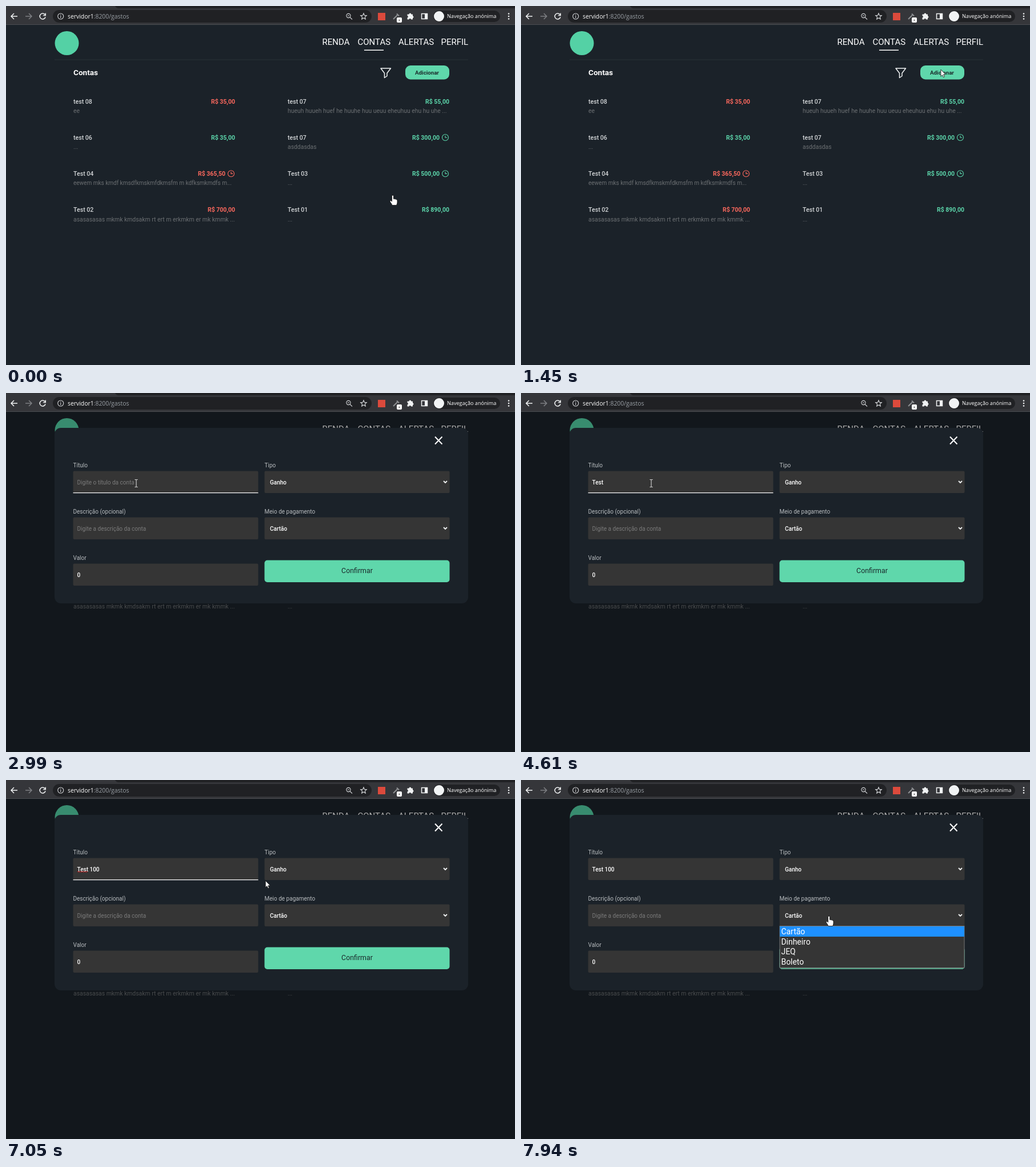
An HTML page for the animation above (8 s loop, 891 by 628 pixels).

```html
<!DOCTYPE html>
<html lang="pt">
<head>
<meta charset="utf-8">
<title>Contas</title>
<style>
  html, body { margin: 0; width: 100%; height: 100%; overflow: hidden; background: #1b2229; }
  svg { display: block; width: 100vw; height: 100vh; }
  text { font: 10px Roboto, sans-serif; fill: #fff; white-space: pre; }
  .chrome text { font-family: "Open Sans", sans-serif; }
  .icon { fill: none; stroke: #f1f3f4; stroke-width: 1.5; }
  .nav text { font-size: 15px; }
  .title { font-size: 10.6px; font-weight: 500; fill: #d3d6d8; }
  .note { font-size: 10.4px; fill: #6b6f72; }
  .money { font-size: 10.5px; font-weight: 700; text-anchor: end; }
  .label { fill: #b9bdc0; }
  .hint { fill: #7b7b7b; }
  .value { font-weight: 500; }
  .field { fill: #353535; }
  .menu text { font-size: 13.9px; }
</style>
</head>
<body>
<svg viewBox="0 0 891 628">
  <rect width="891" height="628" fill="#1b2229"/>

  <g class="chrome">
    <rect width="891" height="33" fill="#35363a"/>
    <path d="M191 0H891V4H197Q193 4 191 0Z" fill="#202124"/>
    <rect y="32" width="891" height="1" fill="#4b4d51"/>
    <rect x="82" y="7" width="558" height="22" rx="11" fill="#202124"/>
    <rect x="748" y="8" width="117" height="20" rx="10" fill="#202124"/>
    <g class="icon">
      <path d="M20 18H9M14 13L9 18L14 23"/>
      <path d="M34 18H45M40 13L45 18L40 23" stroke="#7d7f83"/>
      <path d="M68.300 15.200A5 5 0 1 0 69 19.200M69.200 12.600V16.500H65.200"/>
      <g stroke-width="1.100" stroke="#d5d7da">
        <circle cx="95.700" cy="18" r="5"/>
        <path d="M95.700 17.300V21M95.700 15V16.200"/>
        <circle cx="599.500" cy="17" r="3.600"/>
        <path d="M602 19.700L606 23.500M598 17H601"/>
        <path d="M626 12.700L627.500 16.400L631.300 16.700L628.400 19.200L629.300 23L626 21L622.700 23L623.600 19.200L620.700 16.700L624.500 16.400Z"/>
      </g>
      <path d="M678 23L685 16M684 13.500L688 17.500" stroke="#8c8e91" stroke-width="2"/>
      <rect x="727.500" y="13.500" width="10" height="9"/>
    </g>
    <rect x="651" y="12" width="13" height="13" fill="#dc4a3c"/>
    <rect x="684" y="20" width="9" height="9" rx="2" fill="#fff"/>
    <rect x="687.500" y="24" width="2" height="1.500" fill="#333"/>
    <path d="M702.500 14.500H705.500A1.900 1.900 0 0 1 709.300 14.500H712V17.300A1.900 1.900 0 0 1 712 21V23.500H709A1.800 1.800 0 0 0 705.500 23.500H702.500V20.500A1.800 1.800 0 0 0 702.500 17Z" fill="#f1f3f4"/>
    <rect x="733" y="13" width="5" height="10" fill="#f1f3f4"/>
    <circle cx="758" cy="18" r="9" fill="#f1f3f4"/>
    <text x="772" y="21.300" style="font-size:9.1px">Navegação anónima</text>
    <text x="108" y="22" style="font-size:10.4px">servidor1<tspan fill="#9aa0a6">:8200/gastos</tspan></text>
    <g fill="#f1f3f4">
      <circle cx="880" cy="13.500" r="1.300"/><circle cx="880" cy="18" r="1.300"/><circle cx="880" cy="22.500" r="1.300"/>
    </g>
  </g>

  <circle cx="106.500" cy="65" r="21" fill="#54d1a5"/>
  <g class="nav">
    <text x="553.500" y="67.500">RENDA</text>
    <text x="615.500" y="67.500">CONTAS</text>
    <text x="687" y="67.500">ALERTAS</text>
    <text x="761.500" y="67.500">PERFIL</text>
  </g>
  <rect x="627" y="76.500" width="34" height="1.500" fill="#fff"/>
  <rect x="85" y="93.500" width="724" height="1" fill="#2b3238"/>
  <text x="118" y="121" style="font-size:13.6px;font-weight:700">Contas</text>
  <path class="icon" d="M656 109H673.500L667 117.500V122.500L662.500 125.500V117.500Z" stroke-linejoin="round"/>
  <rect x="699" y="104" width="77" height="24.500" rx="9" fill="#5fd7ab"/>
  <text x="737" y="119.500" text-anchor="middle" style="font-size:9.7px;font-weight:700;fill:#1b2b2c">Adicionar</text>
  <g id="list"></g>

  <g id="modal">
    <rect y="33" width="891" height="595" opacity=".33"/>
    <rect x="85" y="61" width="724" height="307" rx="11" fill="#1b2229"/>
    <path class="icon" d="M751 76.500L763.500 89.500M763.500 76.500L751 89.500" style="stroke:#fff;stroke-width:2"/>
    <g id="form"></g>
    <text id="hint" class="hint" x="124.500" y="159.500">Digite o título da conta</text>
    <text id="typed" class="value" x="124.500" y="159.500"></text>
    <path id="squiggle" d="M125 160.500q1 -1.500 2 0t2 0t2 0t2 0t2 0t2 0t2 0t2 0t2 0" fill="none" stroke="#e02020"/>
    <rect id="caret" y="150" width="1" height="12" fill="#fff"/>
    <rect id="focus" x="117.500" y="174" width="324" height="1.200" fill="#fff"/>
    <rect x="452.500" y="292.500" width="324" height="38.500" rx="5" fill="#5fd7ab"/>
    <text x="614.500" y="315.300" text-anchor="middle" style="font-size:12.4px;fill:#1b2b2c">Confirmar</text>
    <g id="menu" class="menu">
      <path d="M452.500 320H776.500V326A5 5 0 0 1 771.500 331H457.500A5 5 0 0 1 452.500 326Z" fill="#539f83"/>
      <rect x="453" y="255.500" width="323" height="73" fill="#353535" stroke="#8a8a8a" stroke-width=".8"/>
      <rect x="453" y="256" width="323" height="18" fill="#1e90ff"/>
      <text x="455.500" y="270">Cartão</text>
      <text x="455.500" y="287.800">Dinheiro</text>
      <text x="455.500" y="305.200">JEQ</text>
      <text x="455.500" y="323">Boleto</text>
    </g>
  </g>

  <circle id="click" r="10" fill="#fff000" fill-opacity=".58"/>
  <g id="pointer">
    <path id="hand" d="M-1.500 1.500A1.500 1.500 0 0 1 1.500 1.500V6.500Q3.200 5.600 4 7Q5.800 6.300 6.400 7.800Q8 7.400 8 9.300V12.500Q8 15 6.500 17.500H-1Q-2 14.500 -4.800 11.300Q-5.300 9.300 -3.400 9.200L-1.500 11Z" fill="#fff" stroke="#111" stroke-width=".8"/>
    <path id="arrow" d="M0 0V12L2.700 9.500L4.500 13.500L6.400 12.700L4.600 8.700H8.300Z" fill="#fff" stroke="#111" stroke-width=".8"/>
    <path id="beam" d="M-2.500 -6.500H-.7L0 -6L.7 -6.500H2.500M0 -6V6M-2.500 6.500H-.7L0 6L.7 6.500H2.500" fill="none" stroke="#e8e8e8"/>
  </g>
</svg>
<script>
const $ = id => document.getElementById(id);
const show = (id, on) => { $(id).style.display = on ? '' : 'none'; };
const text = (x, y, cls, str, style = '') =>
  `<text x="${x}" y="${y}" class="${cls}" style="${style}">${str}</text>`;

const RED = '#fb685d', GREEN = '#5cd6ab';

function item(col, row, title, note, amount, color, pending, noteSize = 10.4) {
  const x = 118 + col * 375, y = 170.5 + row * 63.2, right = x + 283;
  const clock = `<path d="M${right - 12.500} ${y - 3.700}a5.500 5.500 0 1 0 11 0a5.500 5.500 0 1 0 -11 0M${right - 7} ${y - 7}v3.500h3.200" fill="none" stroke="${color}" stroke-width="1.100"/>`;
  return text(x, y, 'title', title)
    + text(x, y + 16.5, 'note', note, `font-size:${noteSize}px`)
    + text(right - (pending ? 17 : 0), y, 'money', 'R$ ' + amount, `fill:${color}`)
    + (pending ? clock : '');
}

$('list').innerHTML = [
  item(0, 0, 'test 08', 'ee', '35,00', RED),
  item(1, 0, 'test 07', 'hueuh huueh huef he huuhe huu ueuu eheuhuu ehu hu uhe ...', '55,00', GREEN),
  item(0, 1, 'test 06', '...', '35,00', GREEN),
  item(1, 1, 'test 07', 'asddasdas', '300,00', GREEN, true),
  item(0, 2, 'Test 04', 'eewem mks kmdf kmsdfkmskmfdkmsfm m kdfksmkmdfs m...', '365,50', RED, true, 10),
  item(1, 2, 'Test 03', '...', '500,00', GREEN, true),
  item(0, 3, 'Test 02', 'asasasasas mkmk kmdsakm rt ert m erkmkm er mk kmmk ...', '700,00', RED),
  item(1, 3, 'Test 01', '...', '890,00', GREEN)
].join('');

function field(x, row, label, content, cls, select) {
  const y = 136.5 + row * 81;
  return text(x, y - 7, 'label', label)
    + `<rect class="field" x="${x}" y="${y}" width="324" height="38.500" rx="2"/>`
    + text(x + (select ? 9.5 : 7), y + 23, cls, content)
    + (select ? `<path class="icon" d="M${x + 313.5} ${y + 17.500}l3 3l3 -3" style="stroke-width:1.8"/>` : '');
}

$('form').innerHTML =
  field(117.5, 0, 'Título', '', 'value')
  + field(117.5, 1, 'Descrição (opcional)', 'Digite a descrição da conta', 'hint')
  + field(117.5, 2, 'Valor', '0', 'value')
  + field(452.5, 0, 'Tipo', 'Ganho', 'value', true)
  + field(452.5, 1, 'Meio de pagamento', 'Cartão', 'value', true);

// Pointer path: time, x, y
const path = [
  [0, 677, 331], [70, 675, 328], [350, 637, 262], [830, 676, 139], [920, 676, 139],
  [1120, 736, 110], [1390, 736, 110], [1450, 735, 111], [1520, 728, 122],
  [2070, 300, 164], [2400, 228, 158], [6310, 228, 158], [6520, 335, 151],
  [6720, 454, 176], [7050, 454, 176], [7540, 555, 222], [7640, 555, 222],
  [7810, 551, 225], [7870, 551, 225], [7940, 539, 238], [8000, 539, 238]
];
// Pointer shape from each time on
const shapes = [
  [0, 'hand'], [890, 'arrow'], [1040, 'hand'], [1450, 'arrow'], [2000, 'beam'],
  [6700, 'arrow'], [7400, 'hand']
];
const clicks = [[1320, 1390], [2460, 2530], [7610, 7740]];
const keys = [3260, 3680, 3880, 4080, 4680, 4950, 5300, 5430];
const OPEN = 1520, FOCUS = 2460, SPELL = 4750, BLUR = 7610, MENU = 7740, BLINK = 530;

function pointerAt(t) {
  const i = path.findIndex(p => p[0] > t);
  const [t0, x0, y0] = path[i - 1], [t1, x1, y1] = path[i];
  const k = (t - t0) / (t1 - t0);
  return [x0 + (x1 - x0) * k, y0 + (y1 - y0) * k];
}

function draw(t) {
  const count = keys.filter(k => k <= t).length;
  const focused = t >= FOCUS && t < BLUR;
  const lastInput = count ? keys[count - 1] : FOCUS;
  show('modal', t >= OPEN);
  show('hint', !count);
  show('focus', focused);
  show('squiggle', focused && t >= SPELL);
  show('menu', t >= MENU);
  $('typed').textContent = 'Test 100'.slice(0, count);
  show('caret', focused && Math.floor((t - lastInput) / BLINK) % 2 === 0);
  if (t >= OPEN) $('caret').setAttribute('x', 125 + (count ? $('typed').getComputedTextLength() : 0));

  const place = `translate(${pointerAt(t)})`;
  const shape = shapes.filter(s => s[0] <= t).pop()[1];
  for (const id of ['hand', 'arrow', 'beam']) show(id, id === shape);
  $('pointer').setAttribute('transform', place);
  $('click').setAttribute('transform', place);
  show('click', clicks.some(([from, to]) => t >= from && t < to));
}

const start = performance.now();
function tick() {
  draw((performance.now() - start) % 8000);
  requestAnimationFrame(tick);
}
tick();
</script>
</body>
</html>
```
